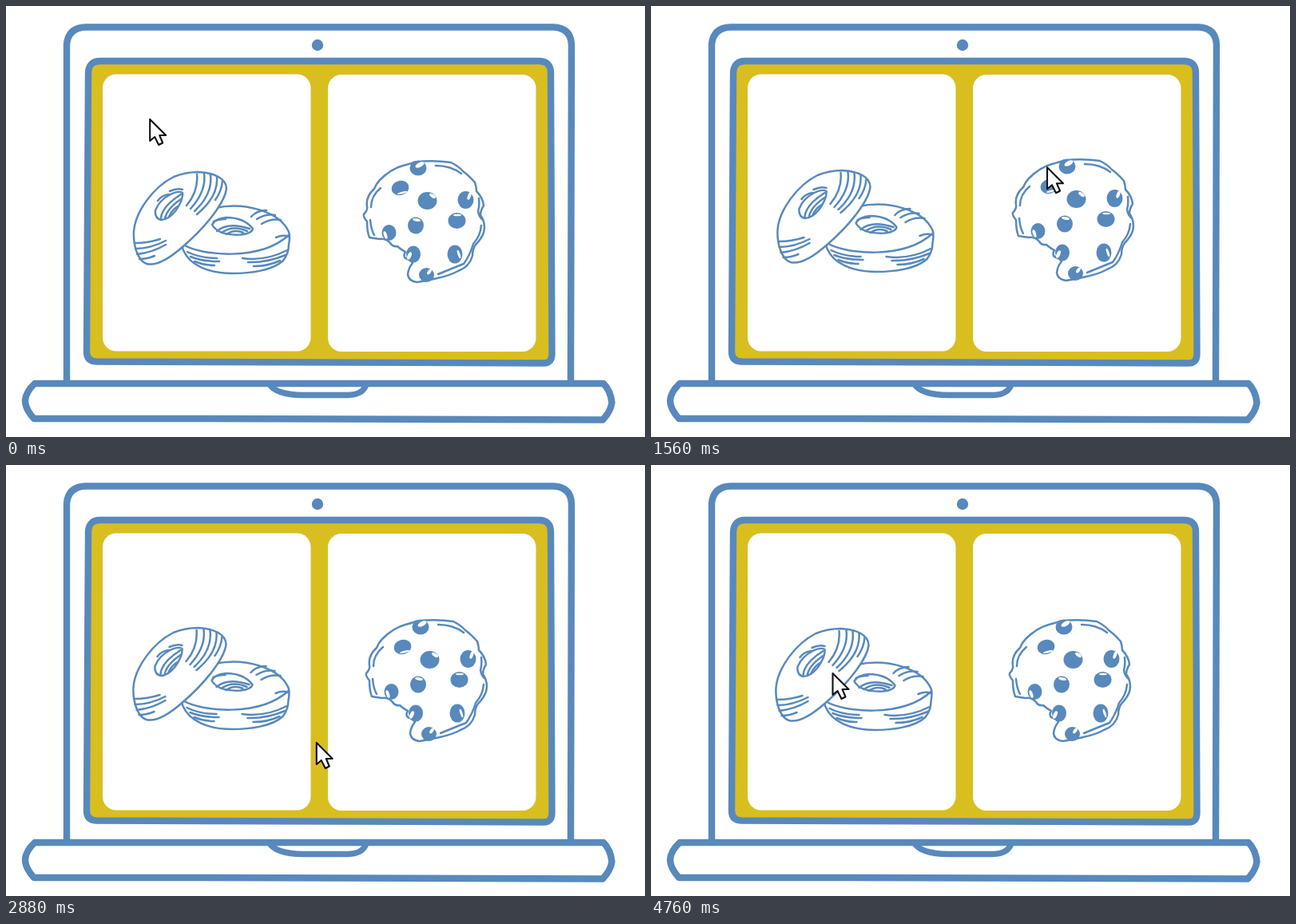
Animation, 800 px wide and 540 px high, one loop 4800 ms. Source, as an HTML page:

```html
<!DOCTYPE html>
<html lang="en">
<head>
<meta charset="utf-8">
<title>Cookies on a laptop</title>
<style>
  :root { --blue: #5889bc; --gold: #d9be20; }
  html, body { margin: 0; width: 100%; height: 100%; overflow: hidden; background: #fff; }
  svg { display: block; width: 800px; height: 540px; }
  .line { fill: none; stroke: var(--blue); stroke-linecap: round; stroke-linejoin: round; }
  .laptop { stroke-width: 8.4; }
  .art { stroke-width: 2.5; }
  .solid { fill: #fff; }
  .chip { fill: var(--blue); stroke: none; }
  .shine { fill: #fff; stroke: none; }

  #donuts {
    transform-origin: 257px 272px;
    animation: donutDrift 4.8s ease-in-out infinite, donutPop 4.8s linear infinite;
  }
  #cookie {
    transform-origin: 525px 270px;
    animation: cookieDrift 4.8s ease-in-out infinite, cookiePop 4.8s linear infinite;
  }
  #cursor { animation: travel 4.8s linear infinite; }

  @keyframes donutDrift {
    0% { translate: 0 0; }
    7.5% { translate: -2.5px -1px; }
    14.6% { translate: -3.8px -2px; }
    19.17% { translate: -3px -3px; }
    32.5% { translate: -1.5px -2px; }
    44.17% { translate: -1px -1px; }
    60% { translate: -.5px -4px; }
    73% { translate: -1px -2px; }
    86.67% { translate: -3.5px -4.5px; }
    99.17%, 100% { translate: -3.5px -3px; }
  }
  @keyframes donutPop {
    0%, 82.1% { scale: 1; }
    87.7% { scale: 1.32; }
    93.3%, 100% { scale: 1; }
  }
  @keyframes cookieDrift {
    0% { translate: 0 0; }
    6.5% { translate: 4.5px 0; }
    19.17% { translate: 2px 1px; }
    26% { translate: 3px 2px; }
    32.5% { translate: 5px -2px; }
    44.17% { translate: 3px -2px; }
    60% { translate: 3px 0; }
    73% { translate: 4px -1px; }
    86.67% { translate: 2px -3px; }
    99.17%, 100% { translate: 1px 0; }
  }
  @keyframes cookiePop {
    0%, 35.4% { scale: 1; }
    40.8% { scale: 1.35; }
    46.2%, 100% { scale: 1; }
  }
  @keyframes travel {
    0% { translate: 180px 142px; }
    5% { translate: 229px 137px; }
    10.4% { translate: 285px 136px; }
    14.6% { translate: 328px 139px; }
    19.17% { translate: 376px 145px; }
    23.3% { translate: 427px 152px; }
    27.5% { translate: 468px 170px; }
    32.5% { translate: 496px 202px; }
    36% { translate: 499px 240px; }
    39.2%, 46.7% { translate: 494px 275px; }
    50% { translate: 478px 300px; }
    55% { translate: 437px 332px; }
    60% { translate: 389px 348px; }
    65% { translate: 339px 344px; }
    70% { translate: 293px 325px; }
    75.8% { translate: 248px 288px; }
    80.8%, 100% { translate: 227.5px 261px; }
  }
</style>
</head>
<body>
<svg viewBox="0 0 800 540">
  <g class="line laptop">
    <path d="M76 472V48Q78 27 100 26.5H686Q707 28 708 48L707 472"/>
    <path fill="var(--gold)" d="M103 85Q103 69 118 69H667Q682 69 682 84L683.5 436Q683.5 447.5 673 447.5L113 445.5Q101 445 101 433Z"/>
    <path class="solid" d="M36 473H748Q757 482 758.5 497Q757 508 747 518.5L255 517H35Q24 505 24 494Q25 483 36 473Z"/>
    <path stroke-width="7.5" d="M330 474Q338 487 372 487.5H428Q447 487 451 474"/>
  </g>
  <circle class="chip" cx="390" cy="49" r="7.2"/>
  <rect class="shine" x="121" y="85.5" width="260.5" height="347" rx="17"/>
  <rect class="shine" x="403" y="86" width="260.5" height="347" rx="17"/>

  <g id="donuts" class="line art">
    <path class="solid" d="M262 253C300 245 343 258 354 283Q356 288 354 299Q354 310 347 319C333 332 304 335 284 335C254 335 230 325 222 306Q220 302 222 299Z"/>
    <path d="M222 299C245 313 318 320 354 287"/>
    <path d="M258 274Q262 266 276 265Q298 265 309 279Q308 285 294 286.500Q266 288 258 274Z"/>
    <path d="M264 282Q278 270 305 279M270 284Q284 274 302 282M276 286Q286 279 297 284M260 270Q266 267 275 267"/>
    <path d="M307 264Q314 256 326 256M314 267Q325 260 337 262M320 273Q331 266 344 268M338 290Q347 286 354 289"/>
    <path d="M227 308Q243 316 264 316M231 314Q245 320 267 320M236 320Q248 325 261 325"/>
    <path d="M296 316Q325 320 352 306M303 321Q326 322 350 312M310 326Q328 326 343 319"/>

    <path class="solid" d="M241 208C261 209 276 216 276 229C274 246 251 276 222 301C204 317 188 326 176 323C165 319 159 300 160 282C162 258 184 227 210 214Q225 208 241 208Z"/>
    <path d="M187 256Q186 266 194 268Q203 268 212 257Q222 243 221 234Q216 231 206 236Q192 243 187 256Z"/>
    <path d="M194 267Q194 252 219 236M199 267Q201 254 219 242M204 264Q207 256 215 251M190 244Q195 237 204 236M205 232Q214 228 221 230"/>
    <path d="M239 211Q241 232 226 250M248 210Q251 232 231 254M256 211Q259 236 236 257M264 214Q266 239 239 261M271 219Q270 232 262 243"/>
    <path d="M161 297Q178 297 193 292M162 304Q181 304 200 294M164 311Q183 309 200 299M167 317Q177 317 186 313"/>
  </g>

  <g id="cookie" class="line art">
    <path class="solid" d="M512 195.500Q535 193 557 196Q567 201 572 207Q579 212 587 221Q589 227 589 232Q597 240 598 250Q594 256 594 262Q601 272 598 284Q595 292 588 299Q584 304 584 313Q580 327 566 332Q555 338 540 341Q528 344 515 346Q504 345 503 336Q504 328 509 322Q508 319 500 316Q497 313 500 308Q493 304 490 301Q484 302 481 297Q476 291 468 292Q460 291 455 290Q452 283 452 270Q447 264 448 261Q453 256 452 251Q450 239 461 229Q464 222 468 218Q482 204 497 200Q505 198 512 195.500Z"/>
    <path d="M538 200Q557 200 570 210M469 228Q457 238 457 252M456 268Q457 280 461 287M592 241Q593 250 591 257Q592 264 597 268M595 275Q594 288 585 298Q581 312 573 323Q558 329 541 336"/>
    <g class="chip">
      <ellipse cx="516" cy="203" rx="10.500" ry="9.500"/>
      <ellipse cx="493.500" cy="228" rx="11" ry="9" transform="rotate(-15 493.500 228)"/>
      <ellipse cx="527.500" cy="244" rx="12" ry="11"/>
      <ellipse cx="575.500" cy="243" rx="10" ry="11"/>
      <ellipse cx="564.500" cy="269" rx="11" ry="10"/>
      <ellipse cx="513" cy="275" rx="10" ry="10.500"/>
      <ellipse cx="479.500" cy="284" rx="9" ry="10"/>
      <ellipse cx="510" cy="311" rx="9" ry="10.500"/>
      <ellipse cx="562" cy="311" rx="9.500" ry="11.500"/>
      <ellipse cx="526.500" cy="337" rx="9.500" ry="9"/>
    </g>
    <g class="shine">
      <ellipse cx="518" cy="199" rx="6" ry="2.800" transform="rotate(-28 518 199)"/>
      <ellipse cx="496" cy="234" rx="6.500" ry="1.300" transform="rotate(-14 496 234)"/>
      <ellipse cx="534" cy="238" rx="4.500" ry="2" transform="rotate(35 534 238)"/>
      <ellipse cx="580" cy="238" rx="2" ry="5" transform="rotate(20 580 238)"/>
      <ellipse cx="565" cy="262" rx="5" ry="1.300"/>
      <ellipse cx="514" cy="268" rx="5" ry="1.700" transform="rotate(12 514 268)"/>
      <ellipse cx="475" cy="287" rx="2" ry="5" transform="rotate(-18 475 287)"/>
      <ellipse cx="505" cy="313" rx="2.300" ry="5" transform="rotate(24 505 313)"/>
      <ellipse cx="567" cy="311" rx="1.500" ry="5.500" transform="rotate(-18 567 311)"/>
      <ellipse cx="530" cy="333" rx="2" ry="4" transform="rotate(35 530 333)"/>
    </g>
  </g>

  <path id="cursor" fill="#fff" stroke="#111" stroke-width="2.100" stroke-linejoin="round" d="M0 0V27L6 22L11 32L16 29.500L12 20H20Z"/>
</svg>
</body>
</html>
```
